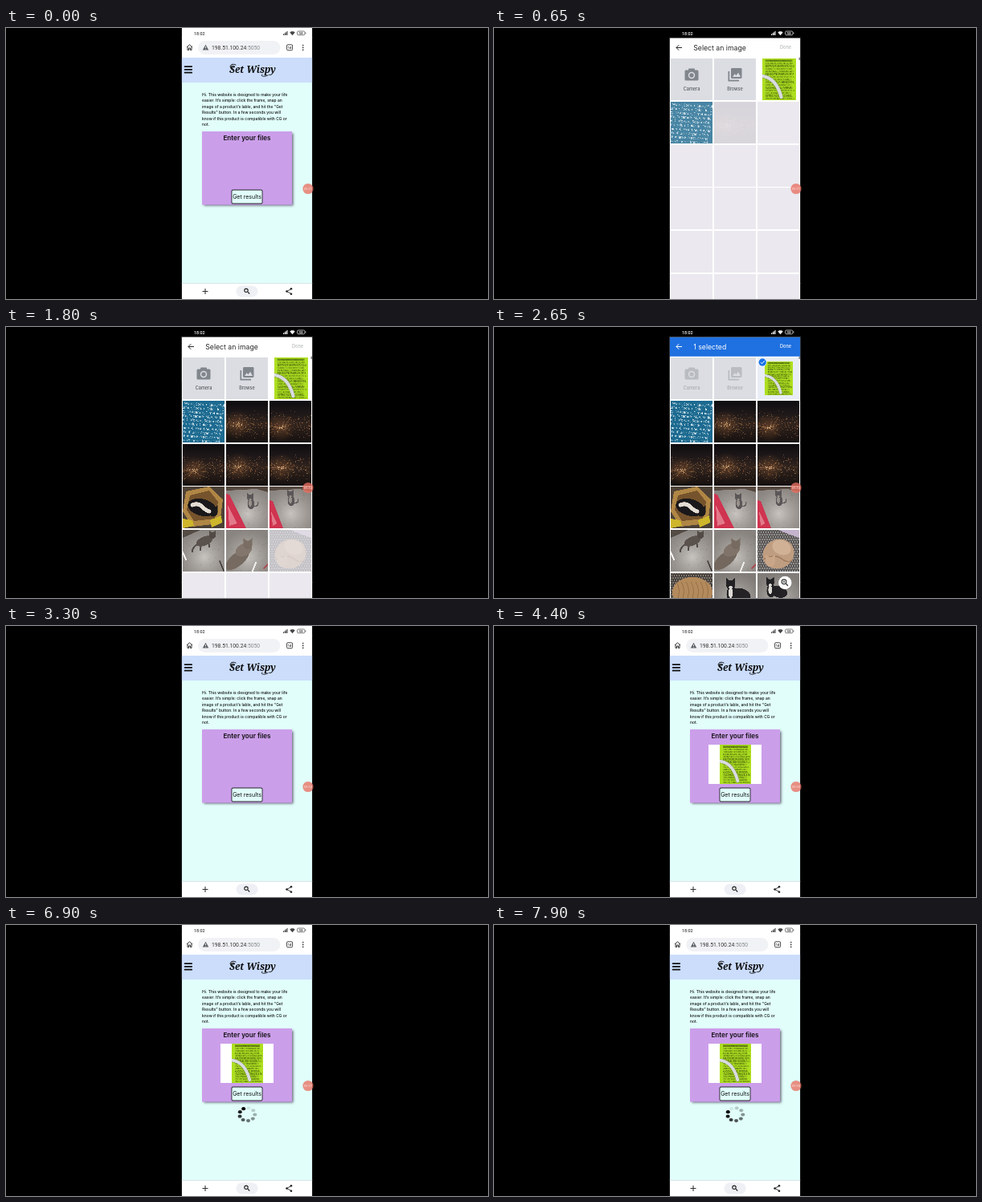
An HTML page with a canvas for the animation above (8 s loop, 600 by 338 pixels).

```html
<!DOCTYPE html>
<html lang="en">
<head>
<meta charset="utf-8">
<title>Label check</title>
<style>
html, body { margin: 0; width: 100%; height: 100%; overflow: hidden; background: #000; }
canvas { display: block; width: 600px; height: 338px; }
</style>
</head>
<body>
<canvas id="stage"></canvas>
<script>
const W = 600, H = 338, LOOP = 8000, TAU = Math.PI * 2;
const LEFT = 218.7, RIGHT = 381.3, SCREEN = RIGHT - LEFT;
const PICKER_IN = 90, SELECT = 2320, PICKER_OUT = 2950, PREVIEW = 3600, LOADING = 4750;
const SANS = 'Inter, sans-serif', ROBOTO = 'Roboto, sans-serif';
const INK = '#111', GREY = '#5f6368', BLUE = '#1f70e0';
const scale = Math.max(1, window.devicePixelRatio || 1);

function surface(w, h, k, canvas = document.createElement('canvas')) {
  canvas.width = Math.round(w * k);
  canvas.height = Math.round(h * k);
  const g = canvas.getContext('2d');
  g.scale(k, k);
  return g;
}

const stage = surface(W, H, scale, document.getElementById('stage'));
const layer = surface(W, H, scale);

const ramp = (t, start, length) => Math.min(1, Math.max(0, (t - start) / length));
const easeOut = p => 1 - (1 - p) ** 3;

function random(seed) {
  return () => (seed = (seed * 16807) % 2147483647) / 2147483647;
}

// Drawing helpers
function rect(g, x, y, w, h, fill, r = 0) {
  g.fillStyle = fill;
  g.beginPath();
  g.roundRect(x, y, w, h, r);
  g.fill();
}

function oval(g, x, y, rx, ry, fill, turn = 0) {
  g.fillStyle = fill;
  g.beginPath();
  g.ellipse(x, y, rx, ry, turn, 0, TAU);
  g.fill();
}

const dot = (g, x, y, r, fill) => oval(g, x, y, r, r, fill);

function trace(g, points) {
  g.beginPath();
  for (let i = 0; i < points.length; i += 2) g.lineTo(points[i], points[i + 1]);
}

function poly(g, fill, ...points) {
  trace(g, points);
  g.closePath();
  g.fillStyle = fill;
  g.fill();
}

function line(g, stroke, width, ...points) {
  trace(g, points);
  g.strokeStyle = stroke;
  g.lineWidth = width;
  g.stroke();
}

function path(g, stroke, width, d) {
  g.strokeStyle = stroke;
  g.lineWidth = width;
  g.stroke(new Path2D(d));
}

function label(g, text, x, y, font, fill, align = 'left') {
  g.font = font;
  g.fillStyle = fill;
  g.textAlign = align;
  g.fillText(text, x, y);
}

function glow(g, x, y, r, inner, outer) {
  const fill = g.createRadialGradient(x, y, 0, x, y, r);
  fill.addColorStop(0, inner);
  fill.addColorStop(1, outer);
  g.fillStyle = fill;
  g.fillRect(0, 0, 52, 52);
}

// Photos are painted once, each on a 52 by 52 tile
function photo(paint, w = 52, h = 52) {
  const g = surface(w, h, 3);
  g.lineCap = 'round';
  paint(g);
  return g.canvas;
}

function limeLabel(g) {
  rect(g, 0, 0, 42, 52, '#aedf20');
  const words = ['GLYCERIN', 'PARFUM', 'AQUA', 'CITRIC ACID', 'SODIUM', 'ALCOHOL', 'BENZOATE', 'EXTRACT', 'OIL'];
  const rnd = random(41);
  for (let y = 4; y < 51; y += 3.35) {
    let row = '';
    while (row.length < 19) row += words[Math.floor(rnd() * words.length)] + ', ';
    rect(g, 4, y - 2.4, 33, 2.6, 'rgba(80,105,20,.22)');
    label(g, row.slice(0, 21), 4 + rnd(), y, '2.9px ' + SANS, 'rgba(50,72,10,.72)');
  }
  rect(g, 4, 1.5, 34, 2.6, 'rgba(50,70,8,.4)');
  path(g, '#8fa95a', 5, 'M1 22Q18 25 24 48');
  path(g, '#d9dbe0', 3.8, 'M1 22Q18 25 24 48');
}

function blueLabel(g) {
  rect(g, 0, 0, 52, 52, '#1c6a90');
  g.rotate(.06);
  const rows = [
    '  Water, Sodium Lauryl Sulf', 'ulfate, Sodium Chloride, C', 'cyl Distearate, Dimethicon',
    'ate, Cocamide MEA, Sodiu', 'te, Citric Acid, Sodium Be', 'trimonium Chloride, Tetra',
    'mium-6, Histidine, Butylen', 's Leaf Juice, Argania Spin', 'a Radiata Extract, Alcohol',
    'thiazolinone, Methylisothi'
  ];
  rows.forEach((row, i) => label(g, row, 0, 4.5 + i * 5.05, '4.3px "Open Sans", sans-serif', '#d6e7ee'));
}

const city = seed => g => {
  const rnd = random(seed);
  const sky = g.createLinearGradient(0, 0, 0, 52);
  sky.addColorStop(0, '#0e0c0f');
  sky.addColorStop(.28, '#1d1718');
  sky.addColorStop(.55, '#30231d');
  sky.addColorStop(1, '#15100f');
  g.fillStyle = sky;
  g.fillRect(0, 0, 52, 52);
  const hx = 14 + rnd() * 24, hy = 26 + rnd() * 10;
  glow(g, hx, hy, 18, 'rgba(190,115,60,.3)', 'rgba(190,115,60,0)');
  for (let i = 0; i < 9; i++) {
    const a = i * .7 + rnd(), reach = 12 + rnd() * 20;
    const ex = hx + Math.cos(a) * reach, ey = hy + Math.sin(a) * reach * .45;
    line(g, 'rgba(225,165,105,.38)', .45, hx, hy, (hx + ex) / 2, (hy + ey) / 2 + rnd() * 3, ex, ey);
  }
  for (let i = 0; i < 260; i++) {
    const y = 12 + (rnd() + rnd()) * 18;
    dot(g, rnd() * 52, y, .2 + rnd() * .35, `hsla(${16 + rnd() * 22} 50% ${35 + rnd() * 35}% / .55)`);
  }
  for (let i = 0; i < 14; i++) dot(g, hx + (rnd() - .5) * 12, hy + (rnd() - .5) * 5, .45, '#f1cfa5');
};

function floor(g, tone, seed) {
  rect(g, 0, 0, 52, 52, tone);
  glow(g, 27, 34, 34, 'rgba(225,222,218,.5)', 'rgba(70,64,60,.35)');
  const rnd = random(seed);
  for (let i = 0; i < 60; i++) dot(g, rnd() * 52, rnd() * 52, .4 + rnd(), 'rgba(90,85,80,.08)');
}

function head(g, x, y, r, coat) {
  dot(g, x, y, r, coat);
  poly(g, coat, x - r, y, x - r, y - r * 1.6, x, y - r * .8);
  poly(g, coat, x + r, y, x + r, y - r * 1.6, x, y - r * .8);
}

function sittingCat(g, x, y, size, coat, chest) {
  g.save();
  g.translate(x, y);
  g.scale(size, size);
  path(g, coat, 1.6, 'M4 8Q10 8 9 3');
  oval(g, 0, 5, 4.6, 7, coat);
  head(g, -1, -3, 4, coat);
  oval(g, -1, 4, 2, 4.5, chest);
  oval(g, -1, -1, 1.7, 1.3, chest);
  g.restore();
}

function boxCat(g) {
  rect(g, 0, 0, 52, 52, '#4d4136');
  poly(g, '#b08645', 4, 6, 33, 0, 50, 16, 46, 46, 12, 50, 0, 31);
  poly(g, '#75532c', 9, 11, 33, 5, 44, 19, 40, 40, 14, 43, 5, 29);
  poly(g, '#cdb62b', 0, 40, 12, 42, 14, 49, 0, 52);
  poly(g, '#cdb62b', 34, 42, 48, 36, 49, 45, 36, 51);
  oval(g, 24, 26, 18, 10.5, '#1a181a', .25);
  head(g, 38, 32, 5.5, '#1a181a');
  path(g, '#e4ddd5', 5, 'M12 23Q19 20 24 25T33 31');
}

const redSheet = (x, y, edge, top) => g => {
  floor(g, '#b0aaa6', 17 + x);
  poly(g, '#55483f', 0, 0, 52, 0, 52, 7, 38, 3, 0, 5);
  poly(g, '#cf3450', 0, top, 4, top + 1, edge, 52, 0, 52);
  poly(g, '#e2798a', 2, top + 14, edge * .55, 46, 4, 49);
  sittingCat(g, x, y, .95, '#5b5657', '#98918c');
};

function walkingCat(g) {
  floor(g, '#aeaaa6', 77);
  poly(g, '#544b45', 0, 0, 22, 0, 0, 10);
  path(g, '#514a45', 2, 'M18 18Q12 22 12 27');
  line(g, '#514a45', 2, 23, 17, 22, 25);
  line(g, '#514a45', 2, 32, 14, 33, 21);
  oval(g, 27, 14, 11, 5.5, '#5a524c', -.4);
  head(g, 37, 7, 4, '#514a45');
  line(g, '#f0f0ee', 2, 0, 28, 4, 37);
  line(g, '#3b3836', 1.5, 46, 39, 51, 51);
}

function longCat(g) {
  floor(g, '#aaa6a1', 99);
  oval(g, 14, 37, 18, 8, '#74685e', -.7);
  oval(g, 22, 25, 11, 7.5, '#80746a', -.5);
  head(g, 27, 19, 5.5, '#776b61');
  line(g, '#eeeeec', 2, 33, 51, 37, 41);
  line(g, '#b13c45', 1.5, 47, 48, 52, 43);
}

function pattern(g, base, spot) {
  rect(g, 0, 0, 52, 52, base);
  for (let y = 0; y < 18; y++) {
    for (let x = 0; x < 18; x++) dot(g, x * 3 + (y % 2) * 1.5, y * 3, .75, spot);
  }
}

function curledCat(g) {
  pattern(g, '#5a5757', '#aaa6a3');
  poly(g, '#c3b3cc', 26, 0, 52, 0, 52, 10, 38, 5);
  oval(g, 26, 30, 20, 18, '#bf9d80', -.5);
  oval(g, 30, 22, 12, 9, '#d0b196', .4);
  path(g, '#a07d60', 1.6, 'M9 36Q22 30 30 36T43 38');
  head(g, 16, 40, 6, '#c9a688');
}

function patternCat(g) {
  pattern(g, '#45403c', '#9a9188');
  oval(g, 27, 24, 25, 19, '#b38a5c');
  for (let i = 0; i < 7; i++) path(g, 'rgba(135,95,55,.55)', 1, `M${7 + i * 6} 11q6 9 1 24`);
}

const floorCat = (x, y, size) => g => {
  floor(g, '#a09c98', 31 + x);
  oval(g, x + 8 * size, y + 6 * size, 9 * size, 6 * size, '#242224', .3);
  sittingCat(g, x, y, size, '#222123', '#dedad6');
};

const lime = photo(limeLabel, 42, 52);
const photos = [
  lime, ...[blueLabel, city(71), city(1207), city(553), city(9041), city(3317), boxCat,
    redSheet(31, 17, 25, 9), redSheet(27, 13, 17, 17), walkingCat, longCat, curledCat,
    patternCat, floorCat(22, 19, 1.4), floorCat(17, 16, 1.2)].map(p => photo(p))
];

// Phone chrome
function statusBar(g, dark) {
  const ink = dark ? '#f2f2f2' : '#444';
  rect(g, LEFT, 0, SCREEN, 12.6, dark ? '#000' : '#fff');
  label(g, '18:02', 234, 8.8, '500 5.4px ' + ROBOTO, ink);
  for (let i = 0; i < 4; i++) rect(g, 345 + i * 1.5, 7.4 - i * 1.1, 1.1, 1.5 + i * 1.1, ink);
  poly(g, ink, 353.3, 5.4, 355, 4.2, 358, 4.2, 359.7, 5.4, 356.5, 9.2);
  g.strokeStyle = ink;
  g.lineWidth = .7;
  g.beginPath();
  g.roundRect(362.5, 4, 9.5, 4.8, 1.6);
  g.stroke();
  label(g, '58', 367.2, 7.9, '600 4px ' + ROBOTO, ink, 'center');
  rect(g, 372.5, 5.5, .8, 1.8, ink);
}

function magnifier(g, x, y, r, ink) {
  g.strokeStyle = ink;
  g.lineWidth = 1.1;
  g.beginPath();
  g.arc(x - 1, y - 1, r, 0, TAU);
  g.stroke();
  line(g, ink, 1.3, x + r * .5, y + r * .5, x + r + 1, y + r + 1);
}

function browserBars(g) {
  rect(g, LEFT, 11, SCREEN, 26, '#fff');
  path(g, '#333', 1, 'M225 24L228.5 20.8L232 24M226 23.3V27.5H227.6V25H229.4V27.5H231V23.3');
  rect(g, 239, 16, 102.5, 17, '#f1f2f5', 8.5);
  poly(g, GREY, 248.5, 20.8, 252.3, 27.6, 244.7, 27.6);
  rect(g, 248.1, 23, .8, 2.1, '#fff');
  rect(g, 248.1, 25.8, .8, .8, '#fff');
  label(g, '198.51.100.24', 256, 27, '6.75px ' + ROBOTO, '#333');
  label(g, ':5050', 256 + g.measureText('198.51.100.24').width, 27, '6.75px ' + ROBOTO, '#85898d');
  g.strokeStyle = '#333';
  g.lineWidth = .9;
  g.beginPath();
  g.roundRect(349.6, 20.8, 7, 7, 1.2);
  g.stroke();
  label(g, '14', 353.1, 25.8, '600 4px ' + ROBOTO, '#333', 'center');
  for (let i = -1; i < 2; i++) dot(g, 369.7, 24.4 + i * 2.9, .85, '#333');

  rect(g, LEFT, 318, SCREEN, 20, '#fff');
  rect(g, LEFT, 318, SCREEN, 1, '#d9e5e6');
  line(g, '#333', 1.1, 244.5, 328.5, 251.5, 328.5);
  line(g, '#333', 1.1, 248, 325, 248, 332);
  rect(g, 286.5, 321.5, 27, 14, '#eef0f5', 7);
  magnifier(g, 300, 328.3, 2.2, '#222');
  line(g, '#222', .9, 355, 325.5, 349.5, 328.5, 355, 331.5);
  [[355, 325.3], [349.5, 328.5], [355, 331.7]].forEach(([x, y]) => dot(g, x, y, 1.3, '#222'));
}

function siteTitle(g) {
  label(g, 'Set Wispy', 307, 56, 'italic 600 11.8px "Noto Serif", serif', '#0c0c0c', 'center');
  g.lineCap = 'round';
  path(g, '#0c0c0c', 1, 'M286 46C280 43 277 49 281 50C284 50 283 47 281.5 48');
  path(g, '#0c0c0c', .9, 'M326 59C320 62 316 59 319 58');
  g.lineCap = 'butt';
}

function spinner(g, t) {
  const lead = 8 + Math.floor((t - 5925) / 59.1);
  for (let i = 0; i < 9; i++) {
    const age = (((lead - i) % 9) + 9) % 9;
    const a = (2 + i * 40) * Math.PI / 180;
    oval(g, 300.2 + Math.cos(a) * 9.6, 236.2 + Math.sin(a) * 8, 2.5, 2.1, `rgba(0,0,0,${1 - age / 8.7})`);
  }
}

function page(g, t) {
  rect(g, LEFT, 37, SCREEN, 282, '#e1fefb');
  rect(g, LEFT, 37, SCREEN, 31, '#cbddfb');
  browserBars(g);
  for (let i = 0; i < 3; i++) rect(g, 221.8, 47.2 + i * 3.8, 10.2, 1.7, INK, .6);
  siteTitle(g);
  [
    'Hi. This website is designed to make your life',
    'easier. It\u2019s simple: click the frame, snap an',
    'image of a product\u2019s lable, and hit the "Get',
    'Results" button. In a few seconds you will',
    'know if this product is compatible with CG or',
    'not.'
  ].forEach((row, i) => label(g, row, 244, 84.6 + i * 7.5, '500 4.95px ' + SANS, INK));

  g.save();
  g.shadowColor = 'rgba(60,50,75,.75)';
  g.shadowBlur = 3 * scale;
  g.shadowOffsetX = g.shadowOffsetY = 1.5 * scale;
  rect(g, 244, 129, 112, 91.5, '#cb9eea');
  g.restore();
  label(g, 'Enter your files', 300, 139.8, '600 8.1px ' + SANS, INK, 'center');
  if (t >= PREVIEW) {
    rect(g, 267, 148, 66, 49, '#fff');
    g.drawImage(lime, 281, 148, 39, 49);
  }
  rect(g, 280.5, 201.5, 39, 18, '#25262b', 2);
  rect(g, 281.4, 202.4, 37.2, 16.2, '#e1fefb', 1.4);
  label(g, 'Get results', 300, 213, '7px ' + SANS, INK, 'center');
  if (t >= LOADING) spinner(g, t);
}

// Image picker
function cameraIcon(g, x, y) {
  rect(g, x - 8.5, y - 5.5, 17, 13, '#80868b', 1.5);
  rect(g, x - 4, y - 7.5, 8, 4, '#80868b', 1);
  dot(g, x, y + 1, 4.2, '#dbdde2');
  dot(g, x, y + 1, 2.7, '#80868b');
}

function galleryIcon(g, x, y) {
  path(g, '#80868b', 1.7, `M${x - 7.7} ${y - 4}V${y + 7.7}H${x + 5}`);
  rect(g, x - 5, y - 8, 13.5, 13, '#80868b', 1.4);
  poly(g, '#dbdde2', x - 3, y + 3, x - .3, y - .8, x + 1.5, y + 1.2, x + 4, y - 2.2, x + 7, y + 3);
}

function pickerHeader(g, chosen) {
  rect(g, LEFT, 12.6, SCREEN, 24.2, '#fff');
  g.globalAlpha = chosen;
  rect(g, LEFT, 12.6, SCREEN, 24.2, BLUE);
  g.globalAlpha = 1;
  const on = chosen > .5, ink = on ? '#fff' : '#27282a';
  line(g, ink, 1, 234, 24.5, 227, 24.5);
  line(g, ink, 1, 230.2, 21.2, 226.9, 24.5, 230.2, 27.8);
  label(g, on ? '1 selected' : 'Select an image', 248.3, 27.7, '8.7px ' + SANS, ink);
  label(g, 'Done', 363, 26.4, '500 5.5px ' + SANS, on ? '#fff' : '#b4b7ba', 'center');
}

function picker(g, t) {
  const chosen = ramp(t, SELECT, 120);
  g.clearRect(0, 0, W, H);
  rect(g, LEFT, 12.6, SCREEN, 326, '#fff');
  for (let i = 0; i < 18; i++) {
    const x = 220 + (i % 3) * 54, y = Math.round(38 + Math.floor(i / 3) * 53.75);
    if (i < 2) {
      rect(g, x, y, 52, 52, '#dbdde2');
      // Fade the icon as one piece by veiling it with the cell colour
      (i ? galleryIcon : cameraIcon)(g, x + 26, y + 20);
      label(g, i ? 'Browse' : 'Camera', x + 26, y + 40.2, '500 5.5px ' + SANS, '#55595e', 'center');
      rect(g, x, y, 52, 52, `rgba(219,221,226,${chosen * .62})`);
      continue;
    }
    const n = i - 2;
    rect(g, x, y, 52, 52, '#ebe9ef');
    g.globalAlpha = ramp(t, 413 + n * 112, 160);
    if (n) {
      g.drawImage(photos[n], x, y, 52, 52);
    } else {
      rect(g, x, y, 52, 52, chosen ? '#e8edf5' : '#fff');
      const k = 1 - .18 * easeOut(chosen);
      g.drawImage(lime, x + 26.5 - 21 * k, y + 26 - 26 * k, 42 * k, 52 * k);
    }
    g.globalAlpha = 1;
  }
  rect(g, 379.5, 36, 1.5, 4, '#85878b');
  pickerHeader(g, chosen);
  if (chosen) {
    dot(g, 334.2, 44, 5.4 * chosen, '#fff');
    dot(g, 334.2, 44, 4.7 * chosen, '#1a73e8');
    line(g, '#fff', 1, 331.9, 44.1, 333.5, 45.7, 336.7, 42.3);
    dot(g, 362.3, 319.3, 8.8 * chosen, 'rgba(60,60,60,.3)');
    dot(g, 362.3, 319, 8.3 * chosen, '#fff');
    magnifier(g, 362, 318.8, 2.9, '#333');
    line(g, '#333', .8, 359.5, 317.8, 362.5, 317.8);
    line(g, '#333', .8, 361, 316.3, 361, 319.3);
  }
}

function timerBadge(g, t) {
  dot(g, 376, 200.5, 6.6, 'rgba(232,112,98,.78)');
  label(g, '01:' + (11 + Math.floor(t / 1000)), 376, 201.9, '500 3.8px ' + ROBOTO, '#fde3de', 'center');
}

function draw(t) {
  const g = stage;
  rect(g, 0, 0, W, H, '#000');
  g.save();
  g.beginPath();
  g.rect(LEFT, 0, SCREEN, H);
  g.clip();
  page(g, t);
  const open = easeOut(ramp(t, PICKER_IN, 220)) * (1 - ramp(t, PICKER_OUT, 180));
  if (open > 0) {
    picker(layer, t);
    g.globalAlpha = open;
    g.drawImage(layer.canvas, 0, (1 - open) * 24, W, H);
    g.globalAlpha = 1;
  }
  statusBar(g, open > 0);
  g.restore();
  timerBadge(g, t);
}

const begun = performance.now();
function tick() {
  draw((performance.now() - begun) % LOOP);
  requestAnimationFrame(tick);
}
tick();
</script>
</body>
</html>
```
